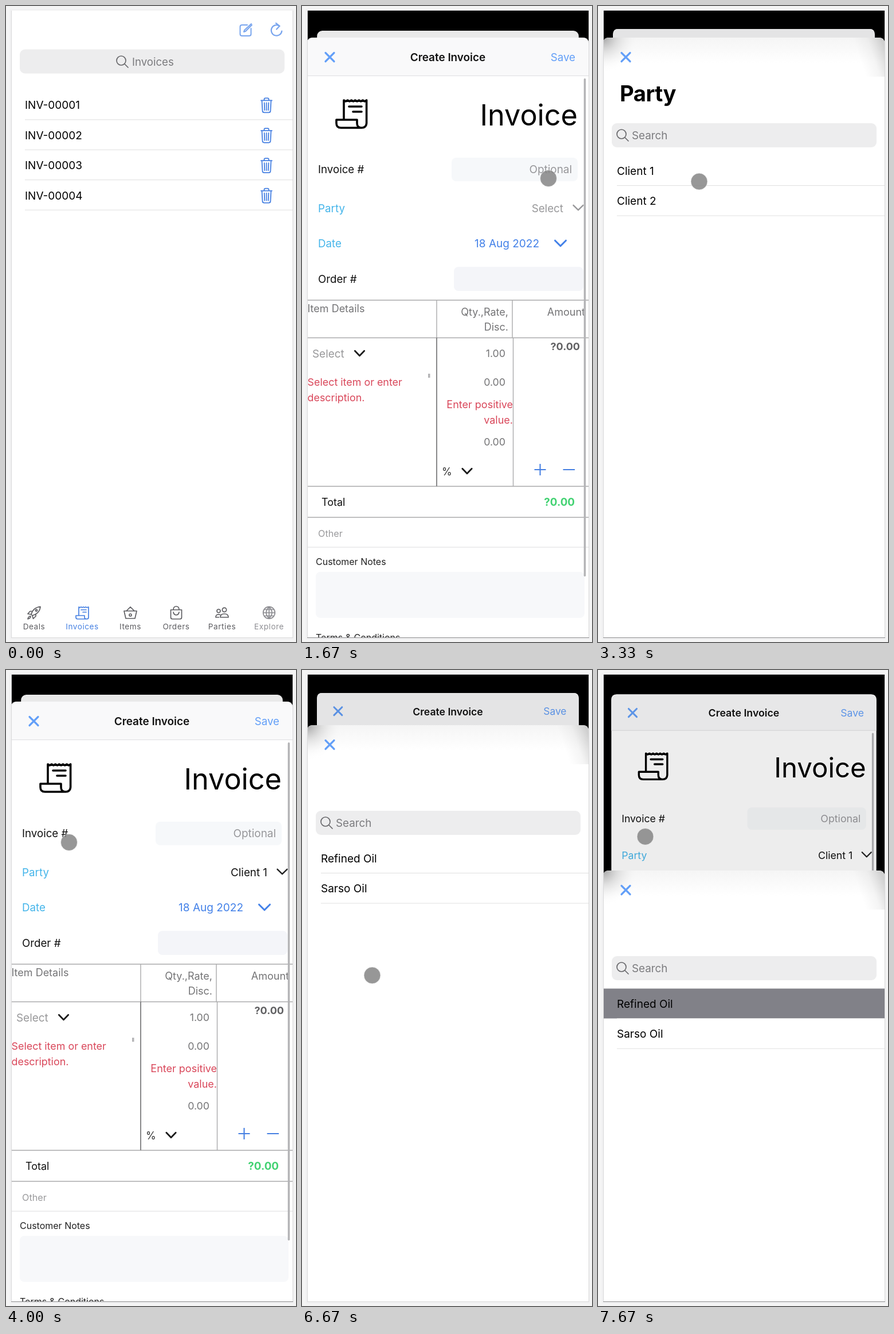
An HTML page that plays this animation: 506x1107 px, repeating every 8000 ms.

```html
<!DOCTYPE html>
<html lang="en">
<head>
<meta charset="utf-8">
<title>Create invoice</title>
<style>
html, body { margin: 0; width: 100%; height: 100%; overflow: hidden; background: #f5f5f5; }
svg { display: block; width: 506px; height: 1107px; font-family: Inter, Roboto, sans-serif; }
.icon { fill: none; stroke-linecap: round; stroke-linejoin: round; }
</style>
</head>
<body>
<svg id="stage" viewBox="0 0 506 1107"></svg>
<script>
const REST = 55, OPENING = 963, GONE = 1107, CLOSING = 349;
const BLUE = '#4680e2', SKY = '#45b5ea', RED = '#d9475a', LINK = '#639ff8';

const text = (x, y, str, fill = '#000', size = 19, attrs = '') =>
  `<text x="${x}" y="${y + size * 0.364}" font-size="${size}" fill="${fill}" ${attrs}>${str}</text>`;
const END = 'text-anchor="end"', MID = 'text-anchor="middle"';
const rect = (x, y, w, h, fill, r = 0) =>
  `<rect x="${x}" y="${y}" width="${w}" height="${h}" rx="${r}" fill="${fill}"/>`;
const line = (d, color, width = 1) => `<path d="${d}" fill="none" stroke="${color}" stroke-width="${width}"/>`;
const icon = (x, y, d, color, width = 1.8) =>
  `<path class="icon" transform="translate(${x} ${y})" d="${d}" stroke="${color}" stroke-width="${width}"/>`;
const group = (id, body) => `<g id="${id}">${body}</g>`;

const ring = (r, x = 0, y = 0) => `M${x - r} ${y}a${r} ${r} 0 1 0 ${2 * r} 0a${r} ${r} 0 1 0 ${-2 * r} 0`;
const GLASS = ring(8, -2, -2) + 'M4 4L10 10';
const TRASH = 'M-9.5-8H9.5M-4-8V-10Q-4-12-2-12H2Q4-12 4-10V-8M-8-8L-7 10Q-6.8 13-4 13H4Q6.8 13 7 10L8-8M-3.8-4L-3.2 9M0-4V9M3.8-4L3.2 9';
const COMPOSE = 'M3-8H-6Q-9.5-8-9.5-5V8Q-9.5 11-6 11H6Q9.5 11 9.5 8V-2M-3 4L-2 1L10-10M-3 4L0 3L11-8';
const REFRESH = 'M5.5-7.2A9.3 9.3 0 1 0 9.3 1.5M-1-12L5.5-7.2L0-1.5';
const CROSS = 'M-7.5-7.5L7.5 7.5M7.5-7.5L-7.5 7.5';
const chevron = (w, h) => `M${-w} ${-h}L0 ${h}L${w} ${-h}`;
const RECEIPT = 'M-13 10V-23l3.3 2l3.3-2l3.3 2l3.3-2l3.3 2l3.3-2l3.3 2l3.3-2l3.3 2l3.3-2l3.3 2l3.3-2V17Q26 25 18 25H-18Q-26 25-26 17V11H10V17Q10 25 18 25M-4-12H18M3-3H18';
const ROCKET = 'M-3 5L-5 3Q-2-9 11-10.5Q10 1-3 5M-3.5-2.5H-7L-11 2L-5 3M3 3V6L-1.5 10.5L-3 5M-6 6Q-10 6-11 11Q-6 10-6 6' + ring(1.6, 4, -4);
const PEOPLE = ring(3.6, 4, -5) + ring(3, -6, -3) + 'M-3 8Q-3 2 4 2Q11 2 11 8ZM-5.5 8H-11Q-11 3-6 3L-3.5 3.5';
const TABS = [
  [49, 'Deals', ROCKET],
  [133, 'Invoices', 'M-6 5V-10L-4-9L-2-10L0-9L2-10L4-9L6-10L8-9L11-10V8Q11 11 8 11H-8Q-11 11-11 8V5H4V8Q4 11 8 11M-2-5H7M1-1H7'],
  [217, 'Items', 'M-11-3H11L8 10H-8ZM-7-3L0-10L7-3' + ring(2, 0, 4)],
  [297, 'Orders', 'M-9.5-5H9.5V8Q9.5 11 6.5 11H-6.5Q-9.5 11-9.5 8ZM-5-5Q-5-11 0-11Q5-11 5-5M-5-1Q-4 4 0 4Q4 4 5-1'],
  [377, 'Parties', PEOPLE],
  [459, 'Explore', ring(10.3) + 'M-10.3 0H10.3M0-10V10M-8.5-5.5H8.5M-8.5 5.5H8.5M0-10.3Q-10 0 0 10.3Q10 0 0-10.3']
];

const SHEET = 'M9 1300V65Q9 55 19 55H490Q500 55 500 65V1300Z';
const sheet = fill => `<path d="${SHEET}" fill="${fill}"/>`;
const flatBar = `<path d="M9 122V65Q9 55 19 55H490Q500 55 500 65V122Z" fill="#f9f9fa"/>` + line('M9 121.5H500', '#dfdfe1');
const close = icon(48.5, 89, CROSS, LINK, 3.2);

function listScreen() {
  const rows = [1, 2, 3, 4].map(n => {
    const y = 120 + n * 52.4;
    return text(33, y, 'INV-0000' + n) + icon(454.5, y, TRASH, BLUE) + line(`M33 ${y + 25.5}H500`, '#dedede');
  }).join('');
  const tabs = TABS.map(([x, name, d], i) => {
    const color = i === 1 ? BLUE : i === 5 ? '#8e8e93' : '#5d5d61';
    return icon(x, 1056, d, color, 1.7) + text(x, 1080, name, color, 13.6, MID + ' letter-spacing=".55"');
  }).join('');
  return '<rect id="listBack" x="9" y="8" width="491" height="1300" fill="#fff"/>' +
    icon(418, 41, COMPOSE, '#79a5ee', 2) + icon(472, 42, REFRESH, '#79a5ee', 2.2) +
    rect(24, 75.5, 462, 42, '#ededee', 9) + icon(203, 97, GLASS, '#68686b', 1.7) +
    text(220, 97.5, 'Invoices', '#7b7b7e', 18.6) + rows + tabs +
    '<rect id="listDim" x="9" y="8" width="491" height="1300"/>';
}

function formScreen() {
  const gray = '#747476';
  return sheet('#fff') + flatBar + close +
    text(254.5, 89.5, 'Create Invoice', '#111', 18.9, MID + ' font-weight="600"') +
    text(477, 89.5, 'Save', LINK, 18.7, END) +
    icon(86, 187, RECEIPT, '#000', 3.6) +
    text(481, 190, 'Invoice', '#000', 50.4, END) +
    text(28, 284.5, 'Invoice #', '#111', 18.7) + rect(261, 264, 220, 41, '#f6f8fa', 8) +
    text(471, 284.5, 'Optional', '#97979a', 18.9, END) +
    text(28, 352, 'Party', SKY, 18.8) +
    text(456, 352, 'Client 1', '#111', 18.8, END + ' id="party"') +
    group('partyArrow', icon(482, 351, chevron(8.5, 4.2), 'currentColor', 2.4)) +
    text(28, 413.5, 'Date', SKY, 18.8) + text(414, 413.5, '18 Aug 2022', '#4280e8', 19, END) +
    icon(451, 413, chevron(9.5, 4.8), '#4280e8', 3) +
    text(28, 475.5, 'Order #', '#111', 18.7) + rect(265, 454, 226, 42, '#f4f5f9', 8) +
    line('M9 512H500M9 577.5H500M9 836H500M9 890H500', '#aaaaac', 1.5) +
    line('M235 512V577M367 512V577M368.5 577V836', '#aaaaac', 1.4) + line('M235 577V836', '#88888a', 2) +
    text(9.5, 526.5, 'Item Details', gray, 18) +
    text(360, 532, 'Qty.,Rate,', gray, 18, END) + text(360, 558.5, 'Disc.', gray, 18, END) +
    text(494, 532, 'Amount', gray, 18, END) +
    text(485, 592.5, '?0.00', '#606062', 18, END + ' font-weight="700"') +
    text(18, 605.5, 'Select', '#98989a', 18.9, 'id="itemSelect"') + icon(100.5, 604.5, chevron(8.2, 4.2), '#1b1b1b', 2.8) +
    rect(220, 640, 3.5, 7, '#b5b5b7') +
    text(9.5, 654.5, 'Select item or enter', RED, 17.9) + text(9.5, 681.5, 'description.', RED, 17.9) +
    text(355, 604.5, '1.00', gray, 17.8, END) + text(355, 655, '0.00', gray, 17.8, END) +
    text(368, 693.5, 'Enter positive', RED, 18, END) + text(368, 720.5, 'value.', RED, 18, END) +
    text(355, 759, '0.00', gray, 17.8, END) +
    text(244, 810.5, '%', '#333', 18) + icon(288, 809.5, chevron(8.2, 4.2), '#1b1b1b', 2.8) +
    line('M405.5 807H425.5M415.5 797V817M455.5 807H476', BLUE, 2.1) +
    text(34, 863.5, 'Total', '#111', 18) + text(476, 863.5, '?0.00', '#42d272', 18.8, END + ' font-weight="700"') +
    text(28, 918, 'Other', '#9a9a9c', 16.2) + line('M9 942H500', '#dcdcde') +
    text(24, 967, 'Customer Notes', '#222', 16) + rect(24, 985, 469, 80, '#f7f8fa', 8) +
    text(24, 1099, 'Terms &amp; Conditions', '#222', 16) +
    group('scrollbar', rect(491.7, 126, 3.5, 867, '#b4b4b6', 1.7)) +
    `<path id="formDim" d="${SHEET}"/>`;
}

function pickScreen() {
  return sheet('#fff') + group('flat', flatBar) +
    group('glow', ['fade', 'left', 'right'].map(id => `<rect x="9" y="55" width="491" height="68" fill="url(#${id})" clip-path="url(#sheetClip)"/>`).join('')) +
    close + text(38, 152.5, 'Party', '#000', 38.2, 'id="pickTitle" font-weight="700" letter-spacing="-.5"') +
    rect(24, 204, 462, 42, '#ededee', 9) + icon(43, 225, GLASS, '#68686b', 1.7) +
    text(59, 225.5, 'Search', '#7b7b7e', 18.8) +
    '<rect id="picked" x="9" y="260.5" width="491" height="52" fill="#818188"/>' +
    text(33, 287, '', '#000', 19, 'id="row1"') + text(33, 339.5, '', '#000', 19, 'id="row2"') +
    line('M33 312.5H500M33 365H500', '#e0e0e0');
}

const stop = (at, color, alpha) => `<stop offset="${at}" stop-color="${color}" stop-opacity="${alpha}"/>`;
const $ = id => document.getElementById(id);
$('stage').innerHTML = `<defs>
  <clipPath id="view"><rect x="9" y="8" width="491" height="1091"/></clipPath>
  <clipPath id="sheetClip"><path d="${SHEET}"/></clipPath>
  <linearGradient id="fade" x2="0" y2="1">${stop(0, '#f5f5f5', 1)}${stop(0.65, '#fff', 1)}</linearGradient>
  <radialGradient id="left" gradientUnits="userSpaceOnUse" cx="9" cy="55" r="62">${stop(0, '#777', 0.65)}${stop(0.4, '#999', 0.27)}${stop(1, '#fff', 0)}</radialGradient>
  <linearGradient id="right" gradientUnits="userSpaceOnUse" x1="458" y1="95" x2="502" y2="80">${stop(0, '#aaa', 0)}${stop(0.5, '#aaa', 0.12)}${stop(1, '#999', 0.42)}</linearGradient>
</defs>
<rect x="6" y="5" width="497" height="1098" fill="#f1f1f2"/>
<g clip-path="url(#view)">
  <rect x="9" y="8" width="491" height="1092"/>
  ${group('list', listScreen())}
  ${group('loading', rect(9, 8, 491, 2.7, '#89898b') + rect(9, 8, 75, 2.7, '#3f82f4'))}
  ${group('form', formScreen())}
  ${group('pick', pickScreen())}
</g>
<path d="M9.5 8V1099M500.5 8V1099" stroke="#d9d9da"/>
<path id="floor" d="M9 1099.5H501"/>
<circle id="cursor" r="14.5" fill="#868686" fill-opacity=".86" stroke="#fff" stroke-opacity=".6"/>`;

// form sheet top, picker sheet top, cursor x, cursor y
const STEPS = [
  [GONE, GONE], [GONE, GONE], [GONE, GONE, 417.5, 43.5], [OPENING, GONE, 417.5, 43.5],
  [230, GONE, 420, 90], [REST, GONE, 430, 300], [REST, GONE, 436, 365.5], [REST, OPENING, 436, 365.5],
  [REST, 120, 300, 350], [REST, REST, 78, 324], [REST, REST, 176.5, 305.5], [REST, CLOSING, 120, 293],
  [REST, GONE, 110, 300], [REST, GONE, 105, 340], [REST, GONE, 112, 430], [REST, GONE, 125, 515],
  [REST, GONE, 130, 575], [REST, GONE, 105, 602], [REST, GONE, 105, 602], [REST, 410, 110, 590],
  [REST, 96, 122.5, 531.5], [REST, REST, 82.5, 327], [REST, REST, 82.5, 290], [REST, CLOSING, 82.5, 290]
];
const LOOP = 8000;
const TIMES = STEPS.map((_, i) => Math.round(i * 100 / 3) * 10);

const show = (id, on) => $(id).setAttribute('display', on ? 'inline' : 'none');
const move = (id, x, y) => $(id).setAttribute('transform', `translate(${x} ${y})`);

// how far a card has sunk behind a sheet whose top is at y
function sink(y) {
  const p = (GONE - y) / (GONE - REST);
  return p + p * (1 - p) * (1.7 * p - 0.67);
}

function placeCard(id, from, to, offset, depth) {
  const s = 1 - 0.07 * depth, top = from + (to - from) * depth + offset;
  $(id).setAttribute('transform', `translate(${254.5 * (1 - s)} ${top - from * s}) scale(${s})`);
  $(id + 'Dim').setAttribute('opacity', 0.085 * depth);
}

function draw(step) {
  const [formY, pickY, x, y] = STEPS[step];
  const chosen = step >= 11, items = step >= 18, pressed = step === 6 || step === 7;
  const listDepth = sink(formY), topY = pickY < GONE ? pickY : formY;

  placeCard('list', 8, 43, 0, listDepth);
  $('listBack').setAttribute('rx', formY === OPENING ? 0 : 10 * listDepth);
  show('loading', formY === OPENING);
  placeCard('form', REST, 40, formY - REST, sink(pickY));
  show('form', formY < GONE);
  show('scrollbar', formY === REST);

  $('party').textContent = chosen ? 'Client 1' : 'Select';
  $('party').setAttribute('fill', chosen ? '#111' : pressed ? '#cacaca' : '#98989a');
  $('partyArrow').setAttribute('color', chosen ? '#222' : '#98989a');
  $('itemSelect').setAttribute('fill', step >= 17 ? '#cacaca' : '#98989a');

  move('pick', 0, pickY - REST);
  show('pick', pickY < GONE);
  show('flat', pickY === OPENING);
  show('glow', pickY !== OPENING);
  show('pickTitle', !items);
  show('picked', pickY === CLOSING);
  $('row1').textContent = items ? 'Refined Oil' : 'Client 1';
  $('row2').textContent = items ? 'Sarso Oil' : 'Client 2';

  $('floor').setAttribute('stroke', topY === REST || topY === CLOSING ? '#8c8c8e' : '#d9d9da');
  show('cursor', x !== undefined);
  if (x !== undefined) move('cursor', x, y);
}

const start = performance.now();
let shown = -1;
function tick() {
  const t = Math.max(0, performance.now() - start) % LOOP;
  const step = TIMES.filter(time => time <= t).length - 1;
  if (step !== shown) draw(shown = step);
  requestAnimationFrame(tick);
}
tick();
</script>
</body>
</html>
```
